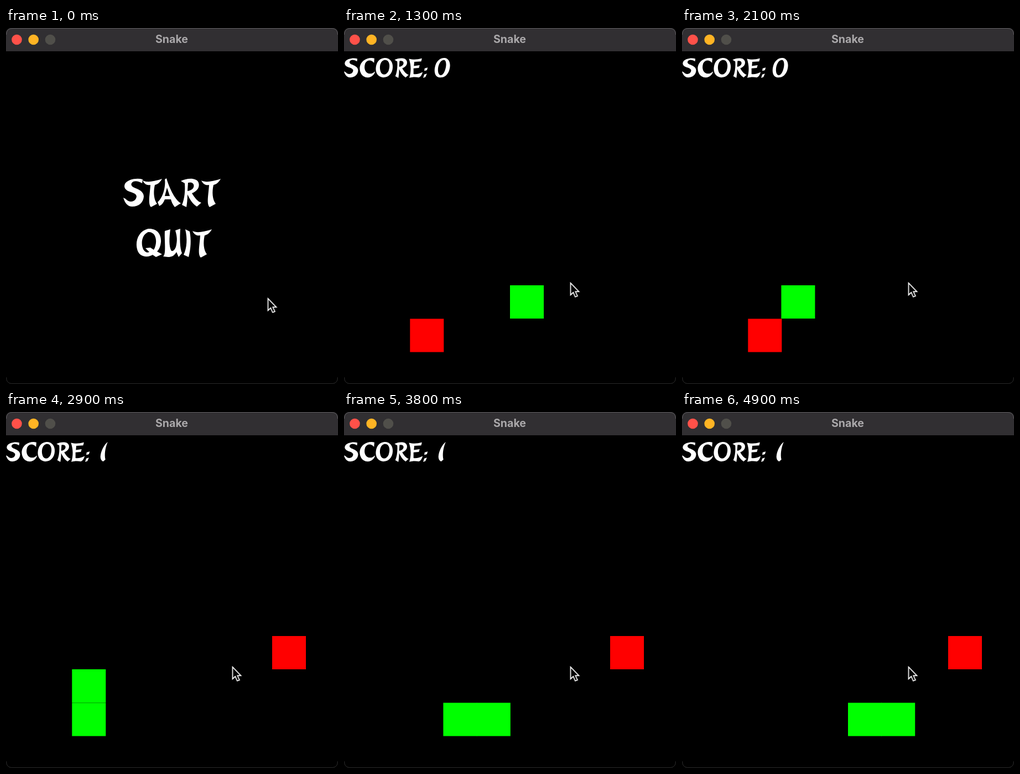
Write an HTML page that moves like this. It is 600x642 px and loops after 5000 ms.

```html
<!DOCTYPE html>
<html lang="en">
<head>
<meta charset="utf-8">
<title>Snake</title>
<style>
  html, body { margin: 0; width: 100%; height: 100%; overflow: hidden; background: #000; }
  svg { display: block; width: 600px; height: 642px; }
  .title { font: 700 19.6px Inter, "Liberation Sans", sans-serif; fill: #aaa8aa; text-anchor: middle; }
  .word { fill: #fff; fill-rule: evenodd; }
  .cell { shape-rendering: crispEdges; }
  .anim { animation: 5s step-end infinite; }

  #menu { animation-name: menu; }
  #game { animation-name: game; }
  #zero { animation-name: zero; }
  #one, #tail { visibility: hidden; }
  #one { animation-name: one; }
  #head { animation-name: head; }
  #tail { animation-name: tail; }
  #food { animation-name: food; }
  #cursor { animation-name: cursor; }

  @keyframes menu { 0% { visibility: visible } 6%, 100% { visibility: hidden } }
  @keyframes game { 0% { opacity: 0 } 6%, 100% { opacity: 1 } }
  @keyframes zero { 0% { visibility: visible } 58%, 100% { visibility: hidden } }
  @keyframes one { 0% { visibility: hidden } 58%, 100% { visibility: visible } }
  @keyframes food {
    0% { transform: translate(119.3px, 524.4px) }
    58%, 100% { transform: translate(481px, 404px) }
  }
  @keyframes head {
    0% { transform: translate(300px, 404px) }
    18% { transform: translate(300px, 464px) }
    28% { transform: translate(239.8px, 464px) }
    38% { transform: translate(179.4px, 464px) }
    48% { transform: translate(119.3px, 464px) }
    58% { transform: translate(119.3px, 524.4px) }
    68% { transform: translate(179.4px, 524.4px) }
    76% { transform: translate(239.8px, 524.4px) }
    86% { transform: translate(300px, 524.4px) }
    96%, 100% { transform: translate(360.2px, 524.4px) }
  }
  @keyframes tail {
    0% { visibility: hidden }
    58% { visibility: visible; transform: translate(119.3px, 464px) }
    68% { visibility: visible; transform: translate(119.3px, 524.4px) }
    76% { visibility: visible; transform: translate(179.4px, 524.4px) }
    86% { visibility: visible; transform: translate(239.8px, 524.4px) }
    96%, 100% { visibility: visible; transform: translate(300px, 524.4px) }
  }
  @keyframes cursor {
    0% { transform: translate(472.5px, 486px) }
    2% { transform: translate(405px, 390px) }
    4% { transform: translate(322px, 275px) }
    18% { transform: translate(372px, 380px) }
    20%, 100% { transform: translate(408.5px, 458px) }
  }
</style>
</head>
<body>
<svg viewBox="0 0 600 642">
  <rect width="600" height="642"/>
  <path d="M0 42V11Q0 0 11 0H589Q600 0 600 11V42Z" fill="#312f32"/>
  <path d="M.5 12Q.5 .5 12 .5H588Q599.5 .5 599.5 12" fill="none" stroke="#5d5b5e"/>
  <path d="M.5 630Q.5 641.5 12 641.5H588Q599.5 641.5 599.5 630" fill="none" stroke="#2c2c2c"/>
  <circle cx="19.5" cy="21" r="9.3" fill="#ff5149"/>
  <circle cx="49.7" cy="21" r="9.3" fill="#ffb424"/>
  <circle cx="80" cy="21" r="9.3" fill="#504f4a"/>
  <text class="title" x="299.5" y="27">Snake</text>

  <g id="menu" class="anim">
    <g class="word" data-word="START" data-x="212 246 274 314 352" data-y="271"></g>
    <g class="word" data-word="QUIT" data-x="235 284 320 336" data-y="362"></g>
  </g>

  <g id="game" class="anim">
    <g class="word" data-word="SCORE:" data-x="0 28 57 90 116 143" data-y="54" data-scale=".69"></g>
    <g id="zero" class="word anim" data-word="0" data-x="163" data-y="54" data-scale=".69"></g>
    <g id="one" class="word anim" data-word="1" data-x="170" data-y="54" data-scale=".69"></g>
    <rect id="food" class="cell anim" width="60.5" height="60.3" fill="#f00"/>
    <rect id="tail" class="cell anim" width="60.5" height="60.3" fill="#0f0"/>
    <rect id="head" class="cell anim" width="60.5" height="60.3" fill="#0f0"/>
  </g>

  <path id="cursor" class="anim" d="M1 1.8V23.4L5.8 18.8L9.4 27L13.4 25.3L9.8 17.4H16Z"
    stroke="#fff" stroke-width="1.7"/>
</svg>
<script>
  // Brush letters on a 52 unit tall box
  const glyphs = {
    S: "M35 2C24-1 8 2 3 10C0 17 4 22 14 25C24 28 26 32 22 38C18 43 10 44 4 37L0 35C3 45 8 51 16 51C28 51 36 44 37 33C37 24 28 20 20 17C13 14 13 9 18 6C23 4 29 6 34 9Z",
    T: "M1 4C9 8 20 6 36 1C32 8 28 11 23 12C20 25 21 38 27 46L16 52C10 46 14 30 15 12C10 13 5 12 1 4Z",
    A: "M16 0C20 14 30 38 42 45L31 52C27 47 25 42 24 38H13C11 43 8 48 3 50L0 43C9 36 15 16 13 2ZM17 17L13 32H22Z",
    R: "M2 5C12 0 30-2 34 8C37 17 30 24 22 27C27 35 32 42 39 44L31 51C23 46 18 38 14 29C14 38 13 46 12 52L4 48C9 36 10 22 9 9ZM15 8L14 23C22 22 27 17 25 11C23 7 19 7 15 8Z",
    Q: "M22 0C38-1 46 10 45 24C44 32 42 37 38 41L47 46L36 51L30 47C22 52 8 52 3 40C-3 24 4 4 22 0ZM22 6C11 10 8 26 13 37C16 42 20 44 24 42L17 35L26 34L32 38C39 27 38 5 22 6Z",
    U: "M3 4L13 1C11 16 10 32 15 40C19 41 23 36 24 28C26 18 24 10 22 3L31 0C30 18 30 34 34 44L28 51L24 42C20 49 15 51 9 51L0 50C6 46 2 22 3 4Z",
    I: "M4 1L12 5C15 20 14 36 10 51L1 47C7 34 8 18 4 1Z",
    C: "M38 13C32 4 20 4 15 14C10 28 16 41 28 41C33 41 36 39 41 35C38 46 30 51 20 51C6 50-1 36 1 23C4 8 20-3 39 1Z",
    O: "M24 0C38 0 46 11 45 25C44 41 34 51 20 51C6 50-1 38 1 24C3 9 11 1 24 0ZM24 5C13 7 9 22 13 35C17 46 28 46 34 34C39 21 37 5 24 5Z",
    E: "M2 2C14 5 24 4 36 1L34 9L16 10L15 21L30 19L28 26L14 27V42C22 43 30 41 38 37C36 44 33 49 28 51C18 49 10 50 3 52C8 36 8 20 2 2Z",
    ":": "M4 27L12 25L10 32L3 34ZM3 43L10 41L6 50L0 52Z",
    0: "M28 0C40 2 44 16 40 30C36 45 26 52 14 51C3 50-1 38 2 24C5 8 16-1 28 0ZM26 5C16 5 9 20 10 34C11 44 16 47 21 44C30 38 36 8 26 5Z",
    1: "M20 0C10 8 2 24 1 38C1 44 3 49 8 51L14 46C11 34 13 16 20 0Z"
  };

  for (const el of document.querySelectorAll("[data-word]")) {
    const { word, x, y, scale = 1 } = el.dataset;
    const xs = x.split(" ");
    el.setAttribute("role", "img");
    el.setAttribute("aria-label", word);
    el.innerHTML = [...word].map((c, i) =>
      `<path d="${glyphs[c]}" transform="translate(${xs[i]} ${y}) scale(${scale})"/>`).join("");
  }
</script>
</body>
</html>
```
